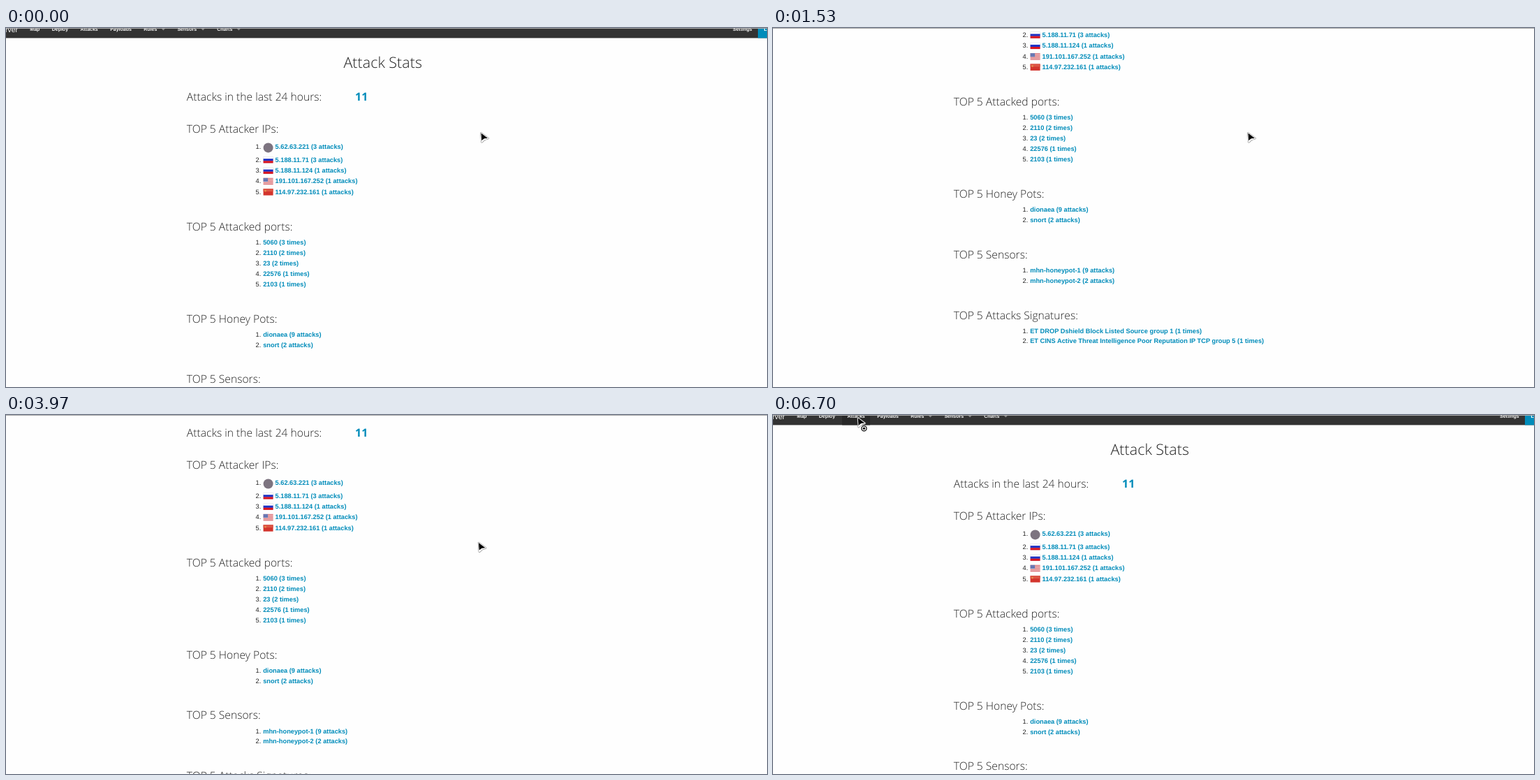
Write an HTML page that moves like this. It is 1090 by 514 pixels and loops after 8000 ms.

```html
<!DOCTYPE html>
<html lang="en">
<head>
<meta charset="utf-8">
<title>Attack Stats</title>
<style>
  html, body { margin: 0; width: 100%; height: 100%; overflow: hidden; background: #fefefe; }
  svg { display: block; width: 1090px; height: 514px; }
  text { text-rendering: geometricPrecision; white-space: pre; }
  .title, .head { font-family: "Open Sans", sans-serif; font-weight: 300; fill: #222; }
  .title { font-size: 21.5px; text-anchor: middle; }
  .head { font-size: 15.65px; }
  .count { font: bold 16px "Open Sans", sans-serif; fill: #008cba; }
  .num, .item { font-family: "Liberation Sans", Arial, sans-serif; font-size: 9.27px; }
  .num { fill: #222; }
  .item { font-weight: bold; fill: #008cba; }
  .nav { font: bold 7px "Liberation Sans", Arial, sans-serif; fill: #fff; }
  .brand { font: 10.4px "Liberation Sans", Arial, sans-serif; fill: #fff; text-anchor: end; }
</style>
</head>
<body>
<svg viewBox="0 0 1090 514">
  <g id="page"></g>
  <rect width="1090" height="1" fill="#aaa"/>
  <g id="cursor">
    <g stroke-linejoin="round">
      <path d="M0 0L10 7.5L5 9L1 12.7Z" fill="#777" stroke="#777" stroke-width="2.6"/>
      <path d="M0 0L10 7.5L5 9L1 12.7Z" fill="#fff" stroke="#fff" stroke-width="1.6"/>
      <path d="M0 0L9.5 7.3L4.5 7.8L.8 10.6Z" fill="#000"/>
    </g>
    <g id="click">
      <circle cx="8.7" cy="15" r="4.9" fill="#fff"/>
      <circle cx="8.7" cy="15" r="3.6" fill="#fff" stroke="#111" stroke-width="1.3"/>
      <circle cx="8.7" cy="15" r="1.7" fill="#111"/>
    </g>
  </g>
</svg>
<script>
const LOOP = 8000;
const FIRST = 398, STEP = 133.8;
const NAV_HEIGHT = 14.4;
const NS = "http://www.w3.org/2000/svg";
const byId = id => document.getElementById(id);
const page = byId("page"), cursor = byId("cursor"), click = byId("click");

function add(tag, attrs, content) {
  const el = document.createElementNS(NS, tag);
  for (const key in attrs) el.setAttribute(key, attrs[key]);
  if (content) el.textContent = content;
  return page.appendChild(el);
}
const text = (cls, x, y, str) => add("text", { class: cls, x, y }, str);
const rect = (x, y, width, height, fill) => add("rect", { x, y, width, height, fill });

const icons = {
  ru(x, y) {
    rect(x, y, 14, 9.4, "#ddd");
    rect(x + .5, y + .5, 13, 3, "#fff");
    rect(x, y + 3.2, 14, 3.2, "#1c2fc4");
    rect(x, y + 6.3, 14, 3.1, "#d8131f");
  },
  us(x, y) {
    rect(x, y, 14, 9.4, "#f4dcdc");
    for (let i = 0; i < 5; i++) rect(x, y + i * 2.1, 14, 1.1, "#d9636a");
    rect(x, y, 6.5, 5.2, "#6878b4");
  },
  cn(x, y) {
    rect(x, y, 14, 9.4, "#d3342c");
    rect(x, y, 14, 4, "#dc5545");
    rect(x + 2, y + 2, 2, 2, "#e8a04a");
  },
  tor(x, y) {
    add("circle", { cx: x + 7, cy: y + 6, r: 7, fill: "#7d7480" });
  }
};

function buildNav() {
  rect(0, 0, 1090, NAV_HEIGHT, "#333");
  const hover = rect(99, 0, 40, NAV_HEIGHT, "#272727");
  rect(1077, 0, 13, NAV_HEIGHT, "#008cba");
  text("brand", 17, 5.6, "Server");
  let x = 34.3;
  for (const label of ["Map", "Deploy", "Attacks", "Payloads", "Rules▾", "Sensors▾", "Charts▾"]) {
    const menu = label.endsWith("▾");
    x += text("nav", x, 4.4, label.replace("▾", "")).getComputedTextLength();
    if (menu) add("path", { d: `M${x + 6.2} .6h5.6l-2.8 3Z`, fill: "#8a8a8a" });
    x += menu ? 29.1 : 17.4;
  }
  text("nav", 1041, 4.4, "Settings");
  text("nav", 1085.6, 4.4, "Logout");
  return hover;
}

// Rows are "label" or "icon:label"; the tall tor icon needs extra room.
function section(y, name, rows) {
  text("head", 258.8, y, `TOP 5 ${name}:`);
  y += 20.1;
  rows.forEach((row, i) => {
    const [label, icon] = row.split(":").reverse();
    if (icon === "tor") y += 2.6;
    text("num", 357.6, y, i + 1 + ".");
    if (icon) icons[icon](368.6, y - 7.5);
    text("item", icon ? 385.5 : 368.2, y, label);
    y += icon === "tor" ? 18.6 : icon ? 15.4 : 14.87;
  });
  return y + 37;
}

function buildStats() {
  text("title", 539.7, 56.5, "Attack Stats");
  text("head", 258.8, 104.3, "Attacks in the last 24 hours:");
  text("count", 500, 104.3, "11");
  let y = 150.2;
  y = section(y, "Attacker IPs", [
    "tor:5.62.63.221 (3 attacks)", "ru:5.188.11.71 (3 attacks)", "ru:5.188.11.124 (1 attacks)",
    "us:191.101.167.252 (1 attacks)", "cn:114.97.232.161 (1 attacks)"
  ]);
  y = section(y, "Attacked ports",
    ["5060 (3 times)", "2110 (2 times)", "23 (2 times)", "22576 (1 times)", "2103 (1 times)"]);
  y = section(y, "Honey Pots", ["dionaea (9 attacks)", "snort (2 attacks)"]);
  y = section(y, "Sensors", ["mhn-honeypot-1 (9 attacks)", "mhn-honeypot-2 (2 attacks)"]);
  section(y, "Attacks Signatures", [
    "ET DROP Dshield Block Listed Source group 1 (1 times)",
    "ET CINS Active Threat Intelligence Poor Reputation IP TCP group 5 (1 times)"
  ]);
}

const hover = buildNav();
buildStats();

const clamp = v => Math.min(1, Math.max(0, v));
const smooth = v => v * v * (3 - 2 * v);

// Wheel turns: [start in refreshes, distance], each eased over the same time
const wheel = [[-.3, 78.5], [4.26, 76.6], [5.93, 23.6], [21.3, -77.7], [25.42, -78], [27.14, -23]];
const scrollAt = k => wheel.reduce((sum, [start, dist]) => sum + dist * smooth(clamp((k - start) / 1.43)), 0);

// Pointer route: [refresh, x, y], straight between the points
const route = [
  [15, 680.5, 150.5], [17, 677, 183], [34, 677, 183], [36, 543.5, 184], [37, 269.5, 190],
  [39, 45, 79.5], [41, 34.5, 23.5], [45, 124.5, 5], [47, 121.7, 4.3]
];
function pointerAt(k) {
  const i = Math.max(1, route.findIndex(p => p[0] >= k));
  const [k0, x0, y0] = route[i - 1], [k1, x1, y1] = route[i];
  const p = clamp((k - k0) / (k1 - k0));
  return [x0 + (x1 - x0) * p, y0 + (y1 - y0) * p];
}

function render(t) {
  const k = Math.min(47, Math.floor((t - FIRST) / STEP));
  const [x, y] = pointerAt(k);
  const scroll = k < 0 ? 0 : scrollAt(k);
  page.setAttribute("transform", `translate(0 ${-scroll})`);
  cursor.setAttribute("transform", `translate(${x} ${y})`);
  hover.style.display = x > 99 && x < 139 && y < NAV_HEIGHT ? "" : "none";
  click.style.display = k === 47 ? "" : "none";
}

const start = performance.now();
function tick() {
  render((performance.now() - start) % LOOP);
  requestAnimationFrame(tick);
}
tick();
</script>
</body>
</html>
```
